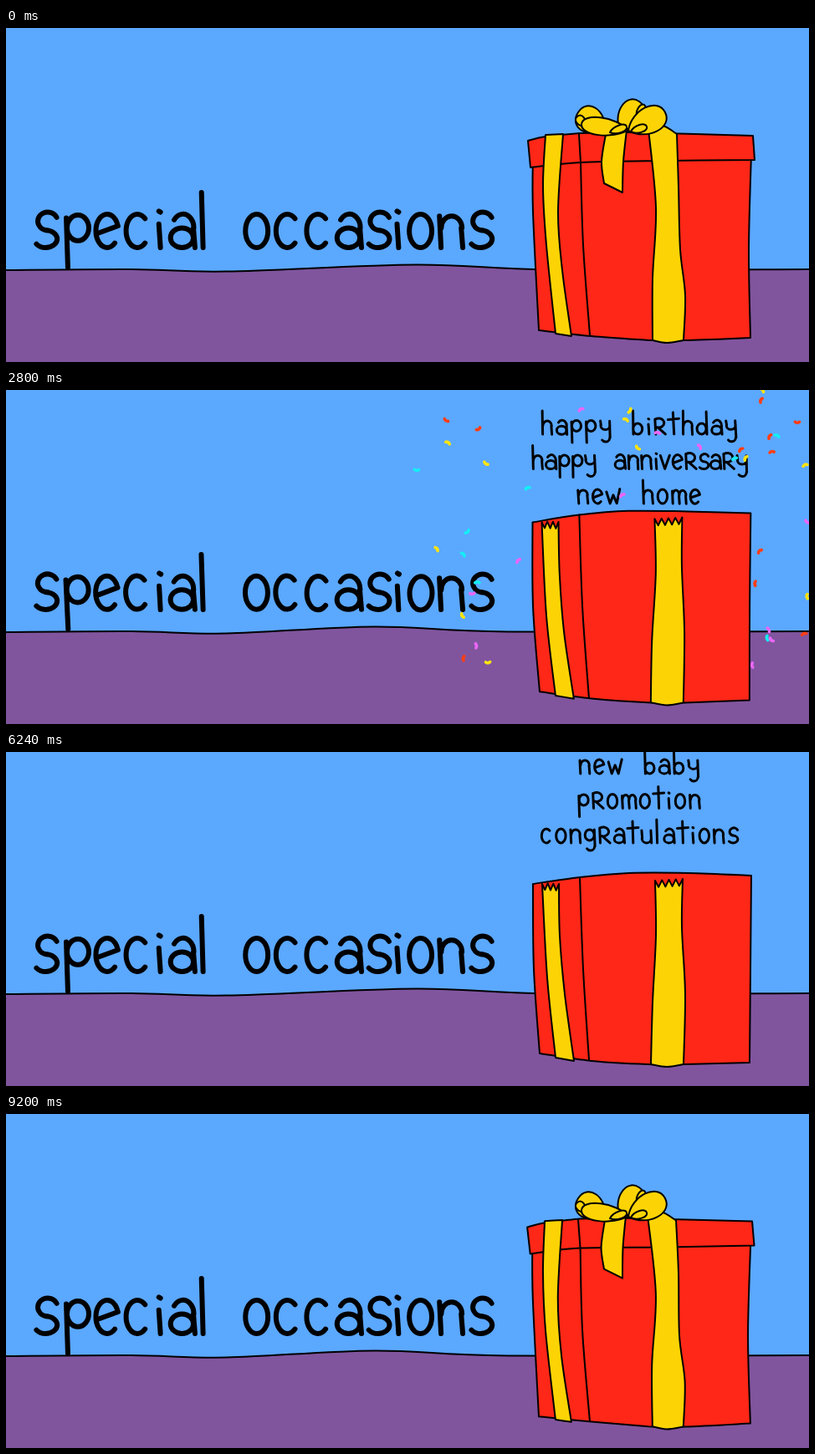
These frames come from a looping animation (960 by 400 pixels, 9.28 s). An HTML page with a canvas:

```html
<!DOCTYPE html>
<html lang="en">
<head>
<meta charset="utf-8">
<title>Special occasions</title>
<style>
  html, body { margin: 0; width: 100%; height: 100%; overflow: hidden; background: #5ba8ff; }
  canvas { display: block; width: 960px; height: 400px; }
</style>
</head>
<body>
<canvas id="stage" width="960" height="400" role="img"
  aria-label="Special occasions: a present opens and greetings rise out of it"></canvas>
<script>
const ctx = document.getElementById('stage').getContext('2d');
const STEP = 80, LOOP = 9280;
const LID_OFF = 10, LID_ON = 106, BURST = 1040, SPREAD = 2800;
const RED = '#ff2717', YELLOW = '#fcd405', SKY = '#5ba8ff', GROUND = '#80559e';
const CONFETTI = ['#ff3d14', '#ffe40f', '#14eef5', '#ea67f5'];

const rand = n => {
  const s = Math.sin(n * 127.1) * 43758.5453;
  return s - Math.floor(s);
};

function setLine(width, color = '#000') {
  ctx.lineWidth = width;
  ctx.strokeStyle = color;
}

// ---- Outlines: smooth lines through key points, "/" makes a corner ----

function pen(shape, closed, sway = 0) {
  const path = new Path2D();
  const parse = pair => {
    const [x, y] = pair.split(',').map(Number);
    return [x + sway * (Math.sin(y / 25) - 1), y + sway * Math.sin(x / 30)];
  };
  let last = null;
  for (const run of shape.split('/')) {
    const pts = run.trim().split(/\s+/).map(parse);
    if (last) pts.unshift(last);
    else path.moveTo(...pts[0]);
    for (let i = 1; i < pts.length; i++) {
      const a = pts[i - 1], b = pts[i];
      const before = pts[i - 2] || a, after = pts[i + 1] || b;
      path.bezierCurveTo(
        a[0] + (b[0] - before[0]) / 6, a[1] + (b[1] - before[1]) / 6,
        b[0] - (after[0] - a[0]) / 6, b[1] - (after[1] - a[1]) / 6, ...b);
    }
    last = pts[pts.length - 1];
  }
  if (closed) path.closePath();
  return path;
}

// Two drawings of each shape give the hand-drawn flicker.
const part = (fill, shape) => ({ fill, paths: [0, 0.5].map(sway => pen(shape, !!fill, sway)) });

function torn(x1, y1, x2, y2, teeth) {
  let edge = '';
  for (let i = 1; i <= teeth * 2; i++) {
    const k = i / (teeth * 2);
    edge += ` / ${x1 + (x2 - x1) * k},${y1 + (y2 - y1) * k + (i % 2 ? 8 : 0)}`;
  }
  return edge;
}

// A teardrop of ribbon from the knot to its tip.
function loop(knotX, knotY, tipX, tipY, fat) {
  const dx = tipX - knotX, dy = tipY - knotY, size = Math.hypot(dx, dy);
  const nx = -dy / size * fat, ny = dx / size * fat;
  const path = new Path2D();
  path.moveTo(knotX, knotY);
  path.bezierCurveTo(knotX + dx * 0.3 + nx, knotY + dy * 0.3 + ny, tipX + nx, tipY + ny, tipX, tipY);
  path.bezierCurveTo(tipX - nx, tipY - ny, knotX + dx * 0.3 - nx, knotY + dy * 0.3 - ny, knotX, knotY);
  return { fill: YELLOW, paths: [path, path] };
}

const horizon = peak =>
  pen(`-5,290 150,289 264,291.5 ${peak},283.5 ${peak + 160},289.5 965,289 / 965,405 / -5,405`, true);
const ground = { fill: GROUND, paths: [horizon(490), horizon(440)] };

const closedBody = [
  part(RED, '630,150 630,220 637,362 / 700,369 768,374 / 812,374 890,371 / 888,265 891,150')
];
const lid = [
  part(RED, '624,135 645,130 686,126 / 745,125 893,129 / 895,158 / 790,159 687,161 627,167'),
  part(null, '685,127 687,161')
];
const closedRibbons = [
  part(null, '687,161 690,260 698,368'),
  part(YELLOW, '645,128 666,127 / 660,220 665,290 676,369 / 657,366 / 646,260 642,190 645,128'),
  part(YELLOW, '768,121 785,117 802,127 / 804,190 806,265 812,320 810,374 / 790,377 773,374 / 773,300 777,215 768,121'),
  part(YELLOW, '717,127 728,122 742,122 / 738,160 737,197 / 715,186 / 712,160 717,127')
];
const tornRibbons = [
  part(YELLOW, `645,128 666,127 / 666,172${torn(666, 172, 640, 172, 4)}`),
  part(YELLOW, `768,121 785,117 802,127 / 805,160${torn(805, 160, 774, 160, 4)}`),
  part(YELLOW, '717,127 742,122 / 750,172 753,210 / 731,194 / 717,127')
];
const bow = [
  loop(716, 122, 684, 101, 21),
  loop(692, 117, 683, 106, 7),
  loop(734, 122, 757, 88, 19),
  loop(754, 105, 763, 92, 5),
  loop(744, 122, 688, 115, 14),
  loop(744, 123, 788, 101, 21),
  loop(722, 125, 742, 118, 6),
  loop(747, 124, 766, 118, 6)
];
const openBox = [
  part(RED, '630,158 686,150 745,145 815,145 891,148 / 890,260 889,372 / 812,374 / 767,374 700,370 638,361 / 631,260 630,158'),
  part(null, '686,150 690,260 697,369'),
  part(YELLOW, `641,158${torn(641, 157, 661, 158, 3)} / 662,220 668,290 679,370 / 657,366 / 647,270 641,158`),
  part(YELLOW, `776,154${torn(776, 154, 809, 152, 4)} / 808,210 812,290 810,374 / 790,377 771,374 / 773,300 777,220 776,154`)
];

function draw({ fill, paths }, variant) {
  if (fill) {
    ctx.fillStyle = fill;
    ctx.fill(paths[variant]);
  }
  ctx.stroke(paths[variant]);
}
const drawAll = (parts, variant) => parts.forEach(p => draw(p, variant));

// ---- Lettering: stems, bowls and arches; bowl angles are in turns ----

const stroke = (...xy) => path => {
  path.moveTo(xy[0], xy[1]);
  for (let i = 2; i < xy.length; i += 2) path.lineTo(xy[i], xy[i + 1]);
};
const stem = (x, top, bottom = 0) => stroke(x - 0.4, top, x + 0.4, bottom);
const bowl = (from, to, cx = 7.5, cy = -8.5, rx = 5.7, ry = 8.5) => path => {
  const a = from * 2 * Math.PI, b = to * 2 * Math.PI;
  path.moveTo(cx + rx * Math.cos(a), cy + ry * Math.sin(a));
  path.ellipse(cx, cy, rx, ry, 0, a, b, to < from);
};
const ring = (cx, cy) => bowl(0, 1, cx, cy, 5.5, 6.5);
const arch = (left, right) => [bowl(0.5, 1, (left + right) / 2, -10, (right - left) / 2, 6), stem(right, -10)];
const cup = cy => bowl(0.5, 0, 7.5, cy, 5.5, 5.5);
const tail = [stem(13, -16, 4), bowl(0, 0.4, 8, 4, 5, 5)];
const curl = [bowl(0.93, 0.25, 8, -13.4, 5, 4.6), bowl(0.75, 1.4, 7, -4.4, 5.8, 4.4)];

const letters = {
  a: [bowl(0.6, 1, 8, -10, 5.5, 7), stem(13.7, -10), bowl(0, 1, 7.5, -5, 5.8, 5)],
  b: [stem(2, -28), ring(7.5, -6.5)],
  c: [bowl(0.13, 0.87)],
  d: [ring(7, -6.5), stem(13, -27)],
  e: [stroke(2, -7, 13, -11), bowl(0.13, 0.95)],
  g: [ring(7, -9.5), tail],
  h: [stem(2, -28), arch(2.5, 13)],
  i: [stem(3.5, -12), stem(3.5, -18.5, -18)],
  l: [stem(2.5, -28)],
  m: [stem(2, -15), arch(2, 10), arch(10, 18)],
  n: [stem(2, -16), arch(2.5, 13)],
  o: [bowl(0, 1)],
  p: [stem(2.5, -15, 10), ring(8, -10)],
  R: [stem(2, -18), bowl(0.65, 1.3, 6, -13.5, 6.5, 5.5), stroke(5, -8, 14, 0)],
  s: curl,
  S: curl,
  t: [stem(6.5, -26), stroke(0, -17.5, 13, -18.5)],
  u: [stem(2, -15, -5.5), cup(-5.5), stem(13, -15)],
  v: [stroke(1, -16, 6, 0, 12, -16)],
  w: [stroke(1, -14, 5, 0, 9, -10, 13, 0, 17, -17)],
  y: [stem(2, -16, -11), cup(-11), tail]
};
const glyphs = {};
for (const c in letters) {
  glyphs[c] = new Path2D();
  letters[c].flat().forEach(add => add(glyphs[c]));
}

function advance(c) {
  if ('il'.includes(c)) return 9;
  if ('tsv'.includes(c)) return 15;
  return ' mw'.includes(c) ? 21 : 17;
}
const textWidth = text => [...text].reduce((sum, c) => sum + advance(c), 0);

function write(text, x, baseline, scale, tracking, weight, variant) {
  setLine(weight / scale);
  [...text].forEach((c, i) => {
    if (glyphs[c]) {
      ctx.save();
      ctx.translate(x, baseline);
      ctx.scale(scale, scale);
      ctx.rotate(variant * (rand(i + text.length) - 0.5) * 0.05);
      ctx.stroke(glyphs[c]);
      ctx.restore();
    }
    x += (advance(c) + tracking) * scale;
  });
}

const greetings = ['happy biRthday', 'happy anniveRsaRy', 'new home', 'RetiRement',
  'gRaduation', 'new baby', 'pRomotion', 'congRatulations'];

function drawGreetings(ms, variant) {
  greetings.forEach((text, i) => {
    const baseline = 53 + 41.5 * i + (SPREAD - ms) * 0.0682;
    if (baseline < -15 || baseline > 190) return;
    const width = textWidth(text);
    const tracking = Math.min(0.4, (260 - width) / text.length);
    write(text, 758 - (width + tracking * text.length) / 2, baseline, 1, tracking, 3, variant);
  });
}

function drawTitle(variant) {
  write('Special', 31, 263, 2.36, -1.7, 6, variant);
  write('occasions', 282, 263, 2.36, -1.5, 6, variant);
}

// ---- Confetti: thrown up against drag, then falling steadily ----

function drawConfetti(ms) {
  const t = (ms - BURST) / 1000, span = (SPREAD - BURST) / 1000, fall = 200;
  for (let i = 0; i < 62; i++) {
    const reach = 470 * rand(i + 0.2) - 270;
    const endY = 330 * rand(i + 0.5);
    const startY = 62 + 80 * Math.sqrt(rand(i + 0.8));
    const lift = startY - endY + fall * span;
    const x = 760 + reach * (1 - Math.exp(-3 * (t + 0.32)));
    const y = endY + fall * (t - span) + lift * (Math.exp(-3 * t) - Math.exp(-3 * span));
    if (y > 332) continue;
    ctx.save();
    ctx.translate(x, y);
    ctx.rotate(rand(i + 0.3) * 6.28 + t * (rand(i + 0.6) - 0.5) * 4);
    setLine(3.6, CONFETTI[i % CONFETTI.length]);
    ctx.beginPath();
    ctx.moveTo(-2.6, -0.6);
    ctx.quadraticCurveTo(0, 1.4, 2.6, -0.6);
    ctx.stroke();
    ctx.restore();
  }
}

// ---- Scene ----

function lidHeight(frame) {
  const rising = Math.max(0, frame - LID_OFF), falling = Math.max(0, LID_ON - frame);
  return Math.min(rising * (48 + 3 * rising), falling * 120);
}

function render(frame) {
  const ms = frame * STEP;
  const textVariant = +(frame % 3 === 2);
  const variant = frame < LID_ON ? textVariant : +(frame % 3 === 1);
  const height = lidHeight(frame);

  ctx.lineCap = ctx.lineJoin = 'round';
  ctx.fillStyle = SKY;
  ctx.fillRect(0, 0, 960, 400);
  setLine(2);
  draw(ground, variant);
  drawTitle(textVariant);

  if (!height) {
    setLine(2);
    [closedBody, lid, closedRibbons, bow].forEach(group => drawAll(group, variant));
    return;
  }
  drawGreetings(ms, textVariant);
  drawConfetti(ms);
  setLine(2);
  drawAll(openBox, variant);
  ctx.save();
  ctx.translate(3, -height);
  [lid, tornRibbons, bow].forEach(group => drawAll(group, variant));
  ctx.restore();
}

const start = performance.now();
function tick() {
  render(Math.floor(((performance.now() - start) % LOOP) / STEP));
  requestAnimationFrame(tick);
}
tick();
</script>
</body>
</html>
```
